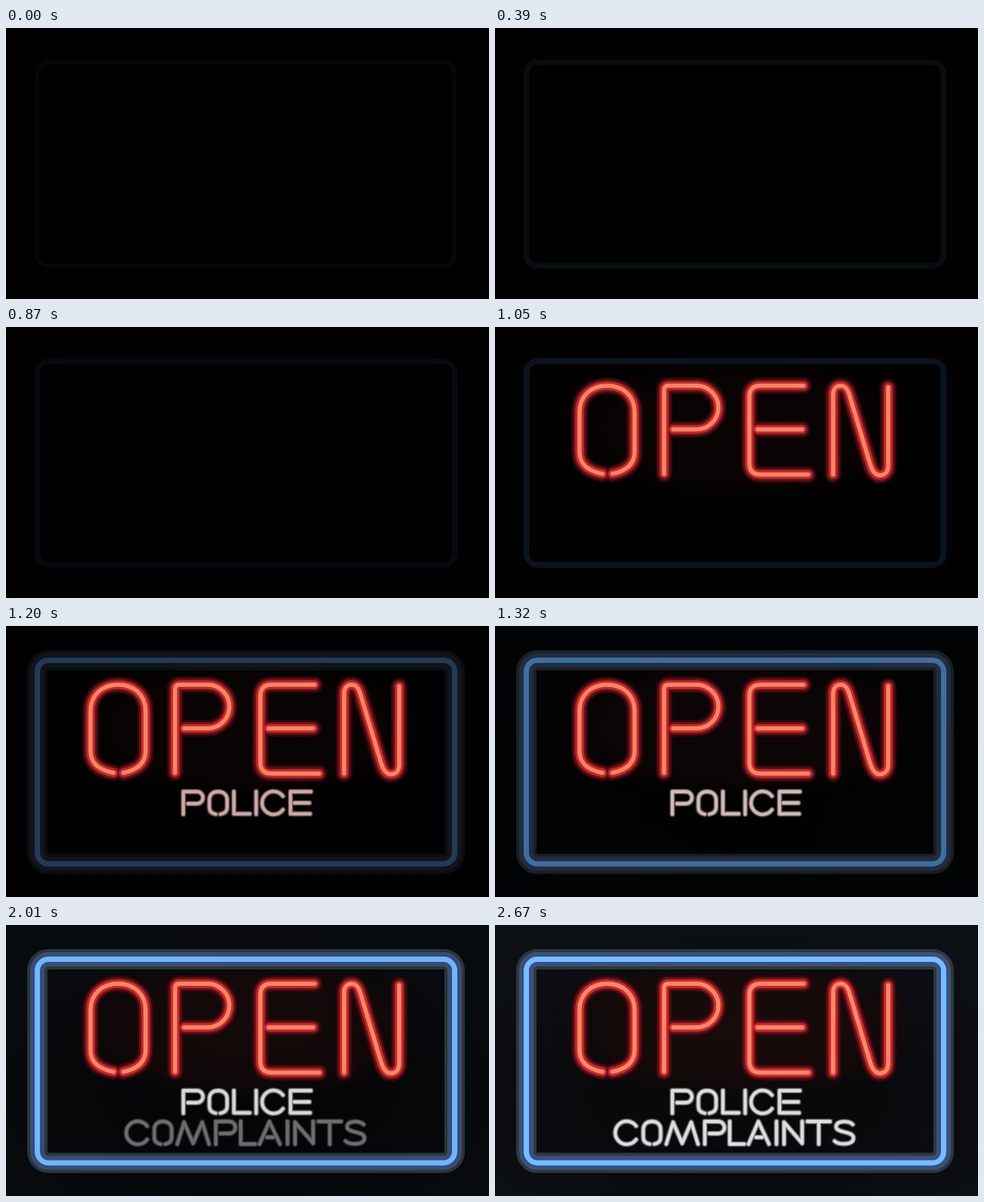
An HTML page for the animation above (8 s loop, 640 by 360 pixels).

```html
<!DOCTYPE html>
<html lang="en">
<head>
<meta charset="utf-8">
<title>Neon sign</title>
<style>
html, body { margin: 0; width: 100%; height: 100%; overflow: hidden; background: #000; }
svg { display: block; width: 100vw; height: 100vh; }
.tube { fill: none; stroke-linecap: round; stroke-linejoin: round; }
.idle, .blue, .red, .line1, .line2, .room, .warm {
  animation: 8s linear infinite both;
}
.idle { animation-name: idle; }
.blue { animation-name: blue; }
.red { animation-name: red; }
.line1 { animation-name: line1; }
.line2 { animation-name: line2; color: #dfdddd; }
.room { animation-name: room; }
.warm { animation-name: warm; }
.white use { stroke: currentColor; }

/* unlit tube around the edge */
@keyframes idle {
  0%, 3% { stroke: #03080c; stroke-width: 5.5px; }
  4.875%, 9.75% { stroke: #070d11; stroke-width: 7.5px; }
  10.5%, 11.25% { stroke: #050b11; stroke-width: 7px; }
  13.125%, 100% { stroke: #080f17; stroke-width: 8px; }
}
@keyframes blue {
  0%, 12% { opacity: 0; }
  13.125% { opacity: .03; }
  13.875% { opacity: .08; }
  15% { opacity: .25; }
  18.375% { opacity: .91; }
  19.125%, 21% { opacity: .93; }
  29.625%, 100% { opacity: 1; }
}
@keyframes red {
  0%, 10.875% { opacity: 0; }
  12.75% { opacity: .92; }
  13.125%, 21% { opacity: .97; }
  29.625%, 100% { opacity: 1; }
}
@keyframes line1 {
  0%, 13.125% { opacity: 0; color: #c99f9a; }
  15% { opacity: 1; color: #cda9a5; }
  18.375%, 21% { opacity: 1; color: #d2d1d1; }
  29.625%, 100% { opacity: 1; color: #dfdddd; }
}
@keyframes line2 {
  0%, 21% { opacity: 0; }
  29.625%, 100% { opacity: 1; }
}
@keyframes room {
  0%, 14.25% { opacity: 0; }
  15% { opacity: .04; }
  18.375% { opacity: .45; }
  19.125%, 21% { opacity: .5; }
  29.625%, 100% { opacity: 1; }
}
@keyframes warm {
  0%, 11.25% { opacity: 0; }
  13.125% { opacity: .4; }
  15% { opacity: .45; }
  18.375%, 21% { opacity: .6; }
  29.625%, 100% { opacity: 1; }
}
</style>
</head>
<body>
<svg viewBox="0 0 640 360" role="img" aria-label="OPEN POLICE COMPLAINTS">
  <defs>
    <radialGradient id="roomFill" cx=".5" cy=".62" r=".6">
      <stop offset="0" stop-color="#070809"/>
      <stop offset=".5" stop-color="#08090b"/>
      <stop offset="1" stop-color="#0c0f13"/>
    </radialGradient>
    <radialGradient id="warmFill">
      <stop offset="0" stop-color="#170c0a"/>
      <stop offset=".7" stop-color="#140a09"/>
      <stop offset="1" stop-color="#140a09" stop-opacity="0"/>
    </radialGradient>
    <rect id="edge" x="41.5" y="45.5" width="553" height="270.5" rx="15"/>
    <g id="open">
      <path d="M142.5 195C122 191 112 182 112 166V113C112 91 128 78 148.5 78S185 91 185 113V166C185 182 175 191 155.5 195"/>
      <path d="M224 195V84Q224 78 230 78H267A29 29 0 0 1 267 136H236"/>
      <path d="M409 78H352Q337 78 337 93V181Q337 196 352 196H415M348 136H407"/>
      <path d="M448 196V90C448 82 452 78 458 78C464 78 467 82 469.5 90L497 182C500 192 504 197 510 197C517 197 521 192 521 184V80"/>
    </g>
    <g id="police">
      <path d="M235 250V220H253A8 8 0 0 1 253 236H241"/>
      <path d="M278 250C272 249 269.5 246 269.5 241V231C269.5 224 274 220 281 220S293 224 293 231V241C293 246 290 249 284 250"/>
      <path d="M302 220V249.500H323M331.500 220V250"/>
      <path d="M367 226A15.300 15.300 0 1 0 367 244"/>
      <path d="M404 220H377V249.500H403M382 235H402"/>
    </g>
    <g id="complaints">
      <path d="M187 267A15.300 15.300 0 1 0 187 285"/>
      <path d="M205 291C199 290 196.500 287 196.500 282V272C196.500 265 201 261 208 261S219.500 265 219.500 272V282C219.500 287 217 290 211 291"/>
      <path d="M227 291L236 262L248 290L260 262L269 291"/>
      <path d="M278 291V261H296A8 8 0 0 1 296 277H284"/>
      <path d="M311 261V291H330"/>
      <path d="M336 291L349 261L363 291M346 282H354"/>
      <path d="M373 261V291M383 291V262L407 290V261"/>
      <path d="M414 261H444M429 261V291"/>
      <path d="M474 265C469 260 452 259 452 268C452 277 475 273 475 283C475 293 455 292 450 287"/>
    </g>
  </defs>

  <rect width="640" height="360"/>
  <rect class="room" width="640" height="360" fill="url(#roomFill)"/>
  <ellipse class="warm" cx="322" cy="135" rx="245" ry="100" fill="url(#warmFill)"/>

  <g class="tube">
    <use class="idle" href="#edge"/>
    <g class="blue">
      <use href="#edge" stroke="#29393e" stroke-width="27"/>
      <use href="#edge" stroke="#40535f" stroke-width="19"/>
      <use href="#edge" stroke="#3c479c" stroke-width="13"/>
      <use href="#edge" stroke="#6ec2ff" stroke-width="7"/>
    </g>
    <g class="red">
      <use href="#open" stroke="#2b0b0d" stroke-width="22"/>
      <use href="#open" stroke="#601519" stroke-width="17"/>
      <use href="#open" stroke="#d8232a" stroke-width="11.500"/>
      <use href="#open" stroke="#ff8d65" stroke-width="5.500"/>
    </g>
    <g class="white line1">
      <use href="#police" stroke-width="8" stroke-opacity=".22"/>
      <use href="#police" stroke-width="5.800" stroke-opacity=".5"/>
      <use href="#police" stroke-width="3.800"/>
    </g>
    <g class="white line2">
      <use href="#complaints" stroke-width="8" stroke-opacity=".22"/>
      <use href="#complaints" stroke-width="5.800" stroke-opacity=".5"/>
      <use href="#complaints" stroke-width="3.800"/>
    </g>
  </g>
</svg>
</body>
</html>
```
